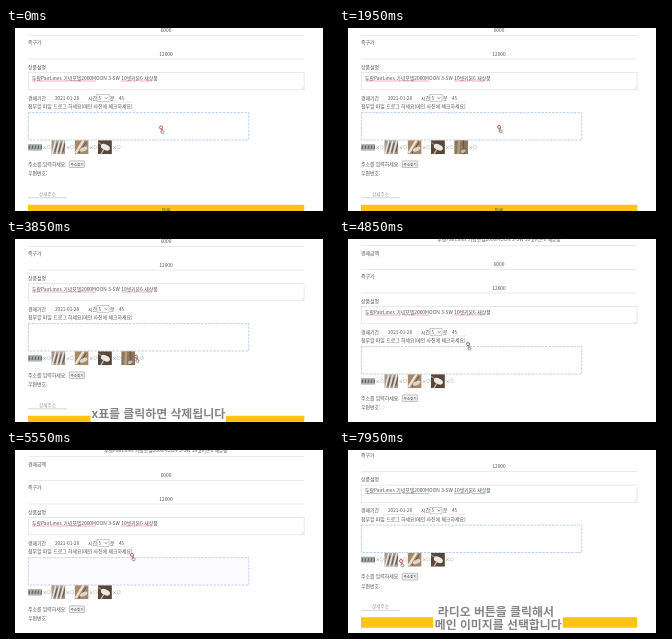
An HTML page that plays this animation: 327 by 183 pixels, repeating every 8 s.

```html
<!DOCTYPE html>
<html lang="ko">
<head>
<meta charset="utf-8">
<title>경매 등록</title>
<style>
html, body { margin: 0; width: 100%; height: 100%; overflow: hidden; background: #000; }
svg { display: block; width: 100vw; height: 100vh; }
text { font-family: "Noto Sans CJK KR", "Noto Sans CJK", "Noto Sans", sans-serif; white-space: pre; }
.caption { font-weight: 700; font-size: 11.9px; fill: #858585; text-anchor: middle; }
</style>
</head>
<body>
<svg id="stage" viewBox="0 0 327 183" xmlns="http://www.w3.org/2000/svg"></svg>
<script>
const LOOP = 8000;
const stage = document.getElementById('stage');

const rect = (x, y, w, h, fill, extra = '') =>
  `<rect x="${x}" y="${y}" width="${w}" height="${h}" fill="${fill}" ${extra}/>`;
const line = (x1, y1, x2, y2, color = '#ddd', width = .6) =>
  `<path d="M${x1} ${y1}L${x2} ${y2}" stroke="${color}" stroke-width="${width}" fill="none"/>`;
// y is the vertical middle of the glyphs
const label = (x, y, str, { size = 4.9, fill = '#555', anchor = 'start' } = {}) =>
  `<text x="${x}" y="${y + size * .37}" font-size="${size}" fill="${fill}" text-anchor="${anchor}">${str}</text>`;
const group = (id, body, extra = '') => `<g id="${id}" ${extra}>${body}</g>`;

const shaft = (x, y, dx, dy, color, width) => line(x, y, x + dx, y + dy, color, width);
const clubHead = (x, y, rx, ry, angle, color) =>
  `<ellipse cx="${x}" cy="${y}" rx="${rx}" ry="${ry}" fill="${color}" transform="rotate(${angle} ${x} ${y})"/>`;

// Each drawing lives in a 14 by 14 tile.
const THUMBS = [
  rect(0, 4, 14, 6.4, '#a3aaa3') + [1, 4, 7, 10, 13].map(x => shaft(x, 9.5, .6, -4, '#59635c', 1)).join('') +
    shaft(0, 9.8, 14, 0, '#dadeda', .8),
  rect(0, 0, 14, 14, '#a5958a') + [1, 5, 9].map(x => shaft(x, 14, 3.5, -14, '#e9e5df', 1.5)).join('') +
    [3.4, 7.4, 11.4].map(x => shaft(x, 12, 2.5, -9, '#5f554e', 1)).join(''),
  rect(0, 0, 14, 14, '#a88766') + shaft(1, 13, 8, -13, '#e8e3da', 2.4) + shaft(4.5, 13, 7, -11, '#5b4a3e', 1) +
    clubHead(9, 9, 4, 2, -25, '#dcd8d0'),
  rect(0, 0, 14, 14, '#58463b') + shaft(0, 2, 6, 4, '#a58d74', 1.2) + clubHead(7.5, 7, 4.8, 2.8, 25, '#ece8e2') +
    shaft(3, 14, 3, -5, '#c6b9a9', 1.3),
  rect(0, 0, 14, 14, '#8c765c') + shaft(4, 14, 1, -14, '#b39c7b', 2.5) + shaft(10, 14, -1, -14, '#6c5a47', 1.5) +
    clubHead(9, 11, 2.5, 1.6, -20, '#c8bfb2')
];

function thumb(art, i) {
  const x = 22 + 23.3 * i;
  return group('thumb' + i, `<svg x="${x}" y="112.2" width="14" height="14" viewBox="0 0 14 14">${art}</svg>` +
    label(x + 16.6, 119, '×', { size: 4.4, fill: '#777', anchor: 'middle' }) +
    `<circle cx="${x + 20.7}" cy="119" r="1.7" fill="#fff" stroke="#aaa" stroke-width=".45"/>`);
}

function form() {
  const mid = { anchor: 'middle', size: 4.8 };
  const product = '두람PairLines 기념모델2000MOON 3-SW 10셋키본6 새상품';
  const misspelt = [[26, 62], [64, 90], [115, 131], [133, 146]];
  return label(160, -23, product, mid) + line(22, -16.5, 298, -16.5) +
    label(22, -9, '경매금액') + label(160, 2, '6000', mid) + line(22, 7.5, 298, 7.5) +
    label(22, 14.3, '즉구가') + label(160, 26, '12000', mid) + line(22, 31, 298, 31) +
    label(22, 38.8, '상품설명') +
    rect(22.3, 44.6, 275.8, 17.2, '#fff', 'stroke="#ddd" stroke-width=".6"') +
    line(295.5, 61.3, 297.7, 59.1, '#aaa', .4) +
    label(26, 50, product) +
    misspelt.map(([a, b]) => line(a, 53, b, 53, '#e0606c', .5)).join('') +
    label(22, 70, '경매기간') + label(49, 70, '2021-01-28', { size: 4.7 }) +
    line(43, 74, 80, 74) + label(82, 70, '시간') +
    rect(91, 66.7, 12, 6.7, '#fff', 'stroke="#999" stroke-width=".5"') +
    label(92.5, 70, '5', { size: 4.6 }) +
    '<path d="M98.8 69.3l1.3 1.4l1.3-1.4" fill="none" stroke="#444" stroke-width=".6"/>' +
    label(104, 70, '분') + label(113, 70, '45', { size: 4.7 }) + line(110, 74, 127, 74) +
    label(22, 78.6, '첨부할 파일 드로그 하세요(메인 사진에 체크하세요)') +
    rect(22.4, 84.6, 220.3, 27.4, '#fff', 'id="drop" stroke-width=".8" stroke-dasharray="2.4 1.2"') +
    THUMBS.map(thumb).join('') +
    label(22, 136, '주소를 입력하세요:') +
    rect(63.3, 132.9, 15.4, 6.6, '#f3f3f3', 'rx=".7" stroke="#888" stroke-width=".5"') +
    label(71, 136.2, '주소찾기', { size: 3.6, fill: '#333', anchor: 'middle' }) +
    label(22, 145.3, '우편번호:') +
    label(33, 166, '상세주소', { size: 4.6, fill: '#999' }) + line(22, 169.8, 61, 169.8, '#bbb') +
    rect(22, 176.8, 276.3, 10.4, '#fdc414', 'rx=".8"') +
    label(160, 182, '등록', { size: 4.7, fill: '#444', anchor: 'middle' });
}

function photo(x, y, w, h, n) {
  const count = 6, step = w / count;
  let clubs = '';
  for (let i = 0; i < count; i++) {
    const left = step * (i + .2);
    clubs += shaft(left, h * .95, step * .9, -h * .9, '#e6e4e0', step * .42) +
      shaft(left + step * .5, h * .9, step * .7, -h * .7, '#4a4846', step * .25);
  }
  const back = ['#9a9d9c', '#9c8e82', '#8d8580'][n];
  return `<svg x="${x}" y="${y}" width="${w}" height="${h}">${rect(0, 0, w, h, back)}${clubs}</svg>` +
    label(x + w / 2, 114, `${n + 1}.jpg`, { size: 4, fill: '#333', anchor: 'middle' });
}

function explorer() {
  const small = { size: 4.1, fill: '#333' };
  const nav = [
    ['즐겨찾기', 90, 0, '#2f8be0'], ['바탕 화면', 96.5, 1, '#2f8be0'], ['다운로드', 103, 1, '#3a83c4'],
    ['문서', 109.6, 1, '#8296a6'], ['사진', 116.3, 1, '#5d9cc9'], ['ZipRec', 123, 1, '#f3cb57'],
    ['Workspace', 129.6, 1, '#f3cb57'], ['옥션 - 주문완료_Re', 136.3, 1, '#f3cb57'],
    ['이미지', 143, 1, '#f3cb57'], ['NubeBox', 152.3, 0, '#1979ca'], ['내 PC', 161, 0, '#4593c8'],
    ['3D 개체', 168, 1, '#36a9c0'], ['다운로드', 174.7, 1, '#3a83c4'], ['동영상', 181.3, 1, '#70818d']
  ];
  const tabs = [['홈', 211], ['공유', 224], ['보기', 238.5], ['사진 도구', 257]];
  return rect(189, 53.8, 130, 130, '#fff', 'stroke="#aaa" stroke-width=".6"') +
    rect(246, 55.5, 22, 7, '#f6f27c') + label(257, 59, '관리', { ...small, fill: '#77702a', anchor: 'middle' }) +
    rect(192, 57.5, 3.2, 3, '#f3d98c') + rect(200, 57.5, 2.5, 3, '#a5bccd') + rect(207, 57.5, 3, 3, '#f3d98c') +
    label(271, 59, '골프채', small) +
    rect(189.3, 63, 15.5, 6.8, '#1769b5') + label(197, 66.4, '파일', { ...small, fill: '#fff', anchor: 'middle' }) +
    tabs.map(([s, x]) => label(x, 66.4, s, { ...small, anchor: 'middle' })).join('') +
    line(189, 70, 318, 70) +
    label(191.5, 76, '←  →  ↑', { ...small, fill: '#888' }) +
    rect(215.5, 72.3, 104, 7.6, '#fff', 'stroke="#ddd" stroke-width=".4"') +
    rect(219, 74.4, 3.8, 3.2, '#f3cb57') + label(225, 76, '› 옥션이미지 › 골프채', small) +
    rect(189.4, 86.6, 45, 6.8, '#d9d9d9') + line(235.3, 82, 235.3, 183) +
    nav.map(([s, y, deep, color]) =>
      rect(196 + deep * 2.6, y - 1.6, 3.3, 3.2, color) +
      label(201.5 + deep * 2.3, y, s, { ...small, size: 3.9 })).join('') +
    [96.5, 103, 109.6, 116.3].map(y => line(230, y + 1, 231.5, y - 1, '#999', .6)).join('') +
    photo(240, 89, 25.5, 17, 0) + photo(270.7, 85, 25.5, 25, 1) + photo(301.5, 85, 25.5, 25, 2);
}

const cursorArt =
  '<path d="M.4 1.5v2.6l-.8-.2l1.1 1.9h1.9l.5-2l-1.7-.5v-1.8z" fill="#fff" stroke="#444" stroke-width=".5"/>' +
  '<circle r="1.5" fill="#fff" stroke="#d8384c" stroke-width=".9"/>';

stage.innerHTML =
  '<defs><clipPath id="page"><rect x="9" y="0" width="308" height="183"/></clipPath></defs>' +
  rect(0, 0, 327, 183, '#000') +
  `<g clip-path="url(#page)">${rect(9, 0, 308, 183, '#fff')}` +
  group('form', form()) + group('explorer', explorer()) + '</g>' +
  group('deleteTip', rect(84.6, 167, 135.2, 16, '#fff') +
    '<text class="caption" x="152.3" y="179">x표를 클릭하면 삭제됩니다</text>') +
  group('radioTip', rect(94.2, 154, 129.6, 29, '#fff') +
    '<text class="caption" x="156.8" y="165.8">라디오 버튼을 클릭해서</text>' +
    '<text class="caption" x="159.2" y="179">메인 이미지를 선택합니다</text>') +
  group('cursor', cursorArt);

const el = id => document.getElementById(id);
const [page, drop, thumb4, win, deleteTip, radioTip, cursor] =
  ['form', 'drop', 'thumb4', 'explorer', 'deleteTip', 'radioTip', 'cursor'].map(el);
const show = (node, on) => node.setAttribute('visibility', on ? 'visible' : 'hidden');
const between = (t, a, b) => t >= a && t < b;

const scrollKeys = [[0, 0], [4250, 0], [4400, 23], [5600, 23], [5900, -9.5]];
const cursorKeys = [
  [0, 155, 99.5], [1800, 170, 99], [2200, 139, 99], [2800, 139, 99], [3400, 130, 117.5],
  [4300, 130, 117.5], [5000, 129, 103.5], [7000, 113, 111], [7100, 113, 111], [7900, 62, 111]
];

function sample(keys, t) {
  const next = keys.findIndex(k => k[0] > t);
  if (next < 0) return keys[keys.length - 1].slice(1);
  const a = keys[next - 1], b = keys[next];
  const u = (t - a[0]) / (b[0] - a[0]), eased = u * u * (3 - 2 * u);
  return a.slice(1).map((v, i) => v + (b[i + 1] - v) * eased);
}

function render(t) {
  page.setAttribute('transform', `translate(0 ${sample(scrollKeys, t)[0]})`);
  cursor.setAttribute('transform', `translate(${sample(cursorKeys, t).join(' ')})`);
  const hovered = between(t, 1200, 1850) || between(t, 5100, 5600);
  drop.setAttribute('fill', hovered ? '#fafaff' : '#fff');
  drop.setAttribute('stroke', hovered ? '#bcc2ee' : '#a9c6e6');
  show(win, between(t, 450, 1850));
  show(thumb4, between(t, 1850, 3950));
  show(deleteTip, between(t, 2200, 4300));
  show(radioTip, t >= 6800);
  show(cursor, !between(t, 450, 1850) && !between(t, 5600, 7000));
}

const start = performance.now();
function tick() {
  render((performance.now() - start) % LOOP);
  requestAnimationFrame(tick);
}
tick();
</script>
</body>
</html>
```
